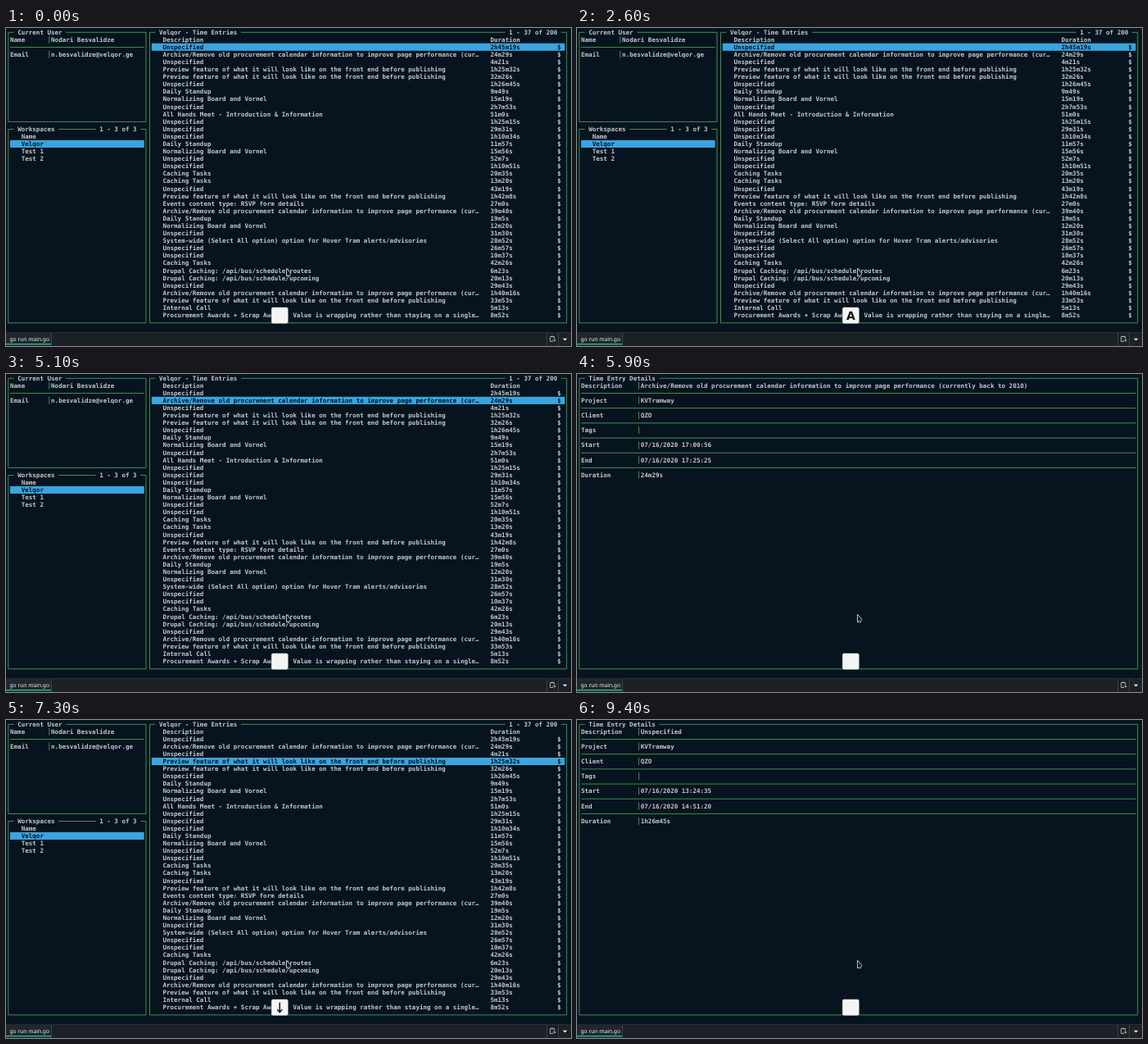
Recreate the animation shown at these times as an HTML page. Size 690 px wide and 388 px high, loop 9500 ms.

```html
<!DOCTYPE html>
<html lang="en">
<head>
<meta charset="utf-8">
<title>Time entries</title>
<style>
html, body { margin: 0; width: 100%; height: 100%; overflow: hidden; background: #07141f; }
svg { display: block; width: 690px; height: 388px; }
text { white-space: pre; text-rendering: geometricPrecision; }
.term text { font: bold 7.551px "DejaVu Sans Mono", monospace; fill: #c3c8cb; }
.term text.on { fill: #07141f; }
.term path { stroke: #51ad5a; stroke-width: .8; fill: none; }
.tab { font: 6.7px "Noto Sans", sans-serif; fill: #eceeef; }
.key { font: bold 14px "DejaVu Sans", sans-serif; fill: #101214; text-anchor: middle; }
</style>
</head>
<body>
<svg viewBox="0 0 690 388" xmlns="http://www.w3.org/2000/svg">
  <rect width="690" height="388" fill="#07141f"/>
  <g class="term" id="term"></g>
  <g id="bar">
    <rect y="371" width="690" height="17" fill="#1b2127"/>
    <rect y="371" width="690" height=".6" fill="#30373d"/>
    <rect y="371" width="55.5" height="17" fill="#20272d"/>
    <path d="M55.5 372V388M660.5 372V388M674.5 372V388" stroke="#474e54" stroke-width=".7"/>
    <rect y="385" width="55" height="1.4" fill="#1abc9c"/>
    <text class="tab" x="4.5" y="382.4">go run main.go</text>
    <path d="M668 382.5H664.6V376.6H669.6V379M666 376.2H668.2M667.6 381H671M669.6 379.4L671.1 381L669.6 382.6" stroke="#e6e8ea" stroke-width=".7" fill="none"/>
    <path d="M679.8 378.8H685.4L682.6 381.6Z" fill="#e6e8ea"/>
  </g>
  <path d="M342.5 293.2V303L344.4 301.6L345.6 303.4L347.9 299.3Z" fill="#171b20" stroke="#e9ebec" stroke-width=".8" stroke-linejoin="round"/>
  <g>
    <rect id="cap" x="324.3" y="341" width="20" height="19.3" rx="1.8" fill="#f5f5f5" stroke="#d9dbdc" stroke-width=".5"/>
    <text id="label" class="key" y="355.8"></text>
    <path id="arrow" d="M0 -6V6M-3 2.6L0 6L3 2.6" fill="none" stroke="#101214" stroke-width="1.5"/>
  </g>
</svg>
<script>
const NS = "http://www.w3.org/2000/svg", LOOP = 9500;
const CW = 4.546, RH = 9.092, PAD = .5;
const $ = id => document.getElementById(id);
const term = $("term"), cap = $("cap"), label = $("label"), arrow = $("arrow");

const colX = c => PAD + c * CW;
const midX = c => colX(c + .5);
const rowY = r => PAD + r * RH;
const midY = r => rowY(r) + 4.8;

const names = {
  u: "Unspecified",
  a: "Archive/Remove old procurement calendar information to improve page performance (currently back to 2010)",
  p: "Preview feature of what it will look like on the front end before publishing",
  d: "Daily Standup",
  n: "Normalizing Board and Vornel",
  h: "All Hands Meet - Introduction & Information",
  c: "Caching Tasks",
  e: "Events content type: RSVP form details",
  s: "System-wide (Select All option) option for Hover Tram alerts/advisories",
  r: "Drupal Caching: /api/bus/schedule/routes",
  g: "Drupal Caching: /api/bus/schedule/upcoming",
  i: "Internal Call",
  w: "Procurement Awards + Scrap Awards: Value is wrapping rather than staying on a single line"
};
const work = ("u2h45m19s a24m29s u4m21s p1h25m32s p32m26s u1h26m45s d9m49s n15m19s u2h7m53s h51m0s " +
  "u1h25m15s u29m31s u1h10m34s d11m57s n15m56s u52m7s u1h10m51s c20m35s c13m20s u43m19s p1h42m8s " +
  "e27m0s a39m40s d19m5s n12m20s u31m30s s28m52s u26m57s u10m37s c42m26s r6m23s g20m13s u29m43s " +
  "a1h40m16s p33m53s i5m13s w8m52s").split(" ").map(s => [names[s[0]], s.slice(1), "$"]);
const test = [["Test 1 Log 2", "14s", "$"], ["Test 1 Log 1", "12s", ""]];
const spaces = ["Velqor", "Test 1", "Test 2"];
const spans = { 1: ["17:00:56", "17:25:25"], 5: ["13:24:35", "14:51:20"] };

// [time, changes]: ws = workspace, data = loaded list, row = entry, open = details
const steps = [
  [0, { ws: 0, data: 0, row: 0, open: false }],
  [200, { ws: 1 }], [600, { data: 1 }],
  [2000, { ws: 0 }], [2400, { data: 0 }],
  [3300, { row: 1 }], [3700, { row: 2 }], [4500, { row: 1 }],
  [5400, { open: true }], [6400, { open: false }],
  [7000, { row: 2 }], [7200, { row: 3 }], [7800, { row: 4 }], [8200, { row: 5 }],
  [8800, { open: true }]
];
// [pressed, released, label]
const keys = [
  [100, 700, "↓"], [900, 1500, "Z"], [1900, 2400, "↑"], [2500, 3000, "A"],
  [3200, 3600, "↓"], [3700, 4200, "↓"], [4400, 5000, "↑"], [5300, 5800, "Enter"],
  [6400, 6900, "Esc"], [7000, 7600, "↓"], [7800, 8100, "↓"], [8200, 8600, "↓"], [8800, 9300, "Enter"]
];

function add(tag, attrs, content) {
  const el = document.createElementNS(NS, tag);
  for (const k in attrs) el.setAttribute(k, attrs[k]);
  if (content) el.textContent = content;
  term.appendChild(el);
}
const line = d => add("path", { d });
const put = (c, r, s, on) => add("text", { x: colX(c), y: rowY(r) + 7.1, class: on ? "on" : "" }, s);
const fill = (c0, c1, r) => add("rect", { x: colX(c0), y: rowY(r), width: (c1 - c0) * CW, height: RH, fill: "#3ba4df" });
const clip = s => s.length > 85 ? s.slice(0, 84) + "…" : s;

function box(c0, r0, c1, r1, title, count) {
  const x0 = midX(c0), x1 = midX(c1), y0 = midY(r0), y1 = midY(r1);
  const after = c0 + 4 + title.length;
  put(c0 + 3, r0, title);
  let top = `M${colX(after)} ${y0}H`;
  if (count) {
    const at = c1 - 2 - count.length;
    put(at, r0, count);
    top += `${colX(at - 1)}M${colX(c1 - 1)} ${y0}H`;
  }
  line(`M${colX(c0 + 2)} ${y0}H${x0}V${y1}H${x1}V${y0}`);
  line(top + x1);
}

function fields(list, split, end) {
  list.forEach(([name, value], i) => {
    const r = 1 + 2 * i;
    put(1, r, name);
    put(split + 1, r, value);
    line(`M${midX(split)} ${rowY(r)}V${rowY(r + 1)}`);
    if (i < list.length - 1) line(`M${colX(1)} ${midY(r + 1)}H${colX(end)}`);
  });
}

function drawDetails(i) {
  const [name, time] = work[i], day = "07/16/2020 ";
  box(0, 0, 150, 39, "Time Entry Details");
  fields([["Description", name], ["Project", "KVTramway"], ["Client", "QZO"], ["Tags", ""],
    ["Start", day + spans[i][0]], ["End", day + spans[i][1]], ["Duration", time]], 16, 150);
}

function drawLists(s) {
  box(0, 0, 37, 12, "Current User");
  fields([["Name", "Nodari Besvalidze"], ["Email", "n.besvalidze@velqor.ge"]], 11, 37);

  box(0, 13, 37, 39, "Workspaces", "1 - 3 of 3");
  put(4, 14, "Name");
  fill(1, 37, 15 + s.ws);
  spaces.forEach((n, i) => put(4, 15 + i, n, i === s.ws));

  const list = s.data ? test : work;
  box(38, 0, 150, 39, spaces[s.data] + " - Time Entries", s.data ? "1 - 2 of 2" : "1 - 37 of 200");
  put(42, 1, "Description");
  put(130, 1, "Duration");
  fill(39, 150, 2 + s.row);
  list.forEach(([name, time, paid], i) => {
    const on = i === s.row;
    put(42, 2 + i, clip(name), on);
    put(130, 2 + i, time, on);
    put(148, 2 + i, paid, on);
  });
}

function drawKey(t) {
  const key = keys.find(k => t >= k[0] && t < k[1] + 100);
  const name = key ? key[2] : "", held = key && t < key[1];
  const isArrow = name === "↓" || name === "↑";
  const width = !held ? 20 : name === "Enter" ? 36.5 : name === "Esc" ? 28 : 20;
  const cx = 324.3 + width / 2;
  const wide = name.length > 1;
  cap.setAttribute("width", width);
  label.textContent = isArrow || (wide && !held) ? "" : name;
  label.setAttribute("x", cx);
  label.setAttribute("y", wide ? 354.2 : 355.8);
  label.style.fontSize = wide ? "10px" : "14px";
  label.style.opacity = held ? 1 : .3;
  arrow.style.display = isArrow ? "" : "none";
  arrow.style.opacity = held ? 1 : .3;
  arrow.setAttribute("transform", `translate(${cx} 350.7)` + (name === "↑" ? " scale(1 -1)" : ""));
}

let shown = "";
function render(t) {
  const s = {};
  for (const [at, change] of steps) if (t >= at) Object.assign(s, change);
  const id = JSON.stringify(s);
  if (id !== shown) {
    shown = id;
    term.textContent = "";
    if (s.open) drawDetails(s.row); else drawLists(s);
  }
  drawKey(t);
}

const start = performance.now();
function tick() {
  render((performance.now() - start) % LOOP);
  requestAnimationFrame(tick);
}
render(0);
requestAnimationFrame(tick);
</script>
</body>
</html>
```
